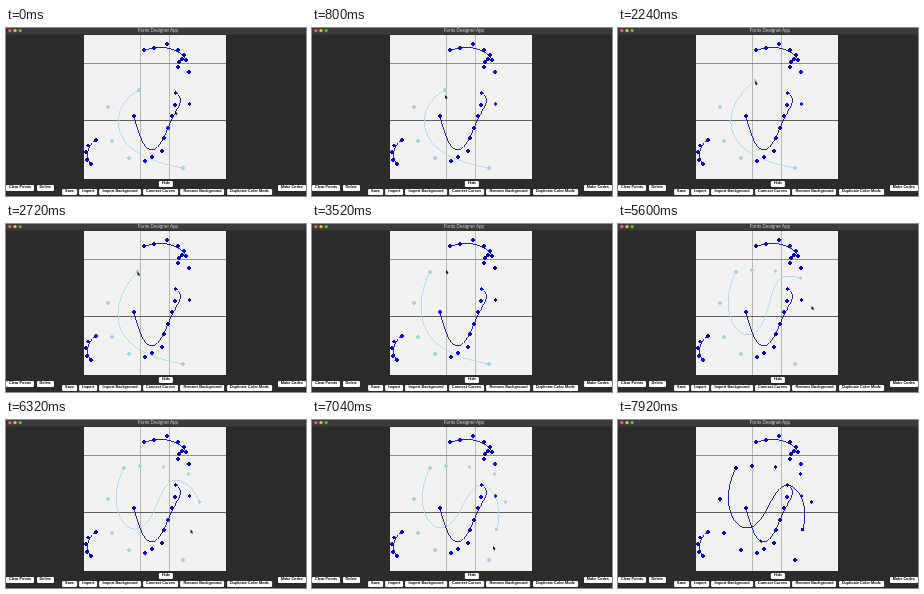
An HTML page for the animation above (8000 ms loop, 300 by 168 pixels).

```html
<!DOCTYPE html>
<html lang="en">
<head>
<meta charset="utf-8">
<title>Fonts Designer App</title>
<style>
  html, body { margin: 0; width: 100%; height: 100%; overflow: hidden; background: #2b2b2b; }
  svg { position: absolute; width: 300px; height: 168px; }
  .title { font: 4.6px "Liberation Sans", Arial, sans-serif; fill: #d0d0d0; text-anchor: middle; }
  .row { position: absolute; display: flex; gap: 2.4px; }
  .row span {
    padding: 0 3px; border-radius: 1.2px; background: #fff; color: #000; white-space: nowrap;
    font: bold 3.8px/5.6px "Liberation Sans", Arial, sans-serif;
  }
  .ink, .draft { shape-rendering: crispEdges; }
  .ink path, .draft path { fill: none; stroke-width: .85; }
  .ink path { stroke: #0000a8; }
  .ink circle { fill: #0000d0; }
  .draft path { stroke: #add8e6; }
  .draft circle { fill: #a5d5df; }
</style>
</head>
<body>
<svg viewBox="0 0 300 168">
  <rect width="300" height="168" fill="#2b2b2b"/>
  <rect width="300" height="6.5" fill="#3b3b3b"/>
  <circle cx="3.8" cy="2.6" r="1.7" fill="#fc5b57"/>
  <circle cx="9" cy="2.6" r="1.7" fill="#e5bf3c"/>
  <circle cx="14.2" cy="2.6" r="1.7" fill="#57c038"/>
  <text class="title" x="152" y="4.3">Fonts Designer App</text>
  <rect x="78" y="7" width="142" height="144" fill="#f2f2f2"/>
  <g fill="none" stroke-width=".7">
    <path d="M134.5 7V151M163.5 7V151" stroke="#9aa592"/>
    <path d="M78 35.5H220" stroke="#626a5c"/>
    <path d="M78 92.5H220" stroke="#202020"/>
  </g>
  <g id="draft"></g>
  <g id="glyph" class="ink"></g>
  <path id="cursor" d="M0 0V3.8L.9 3L1.6 4.5L2.2 4.2L1.6 2.8H2.8Z" fill="#111"/>
</svg>
<div class="row" style="left:0; top:157px"><span>Clear Points</span><span>Delete</span></div>
<div class="row" style="right:0; top:157px"><span>Make Codes</span></div>
<div class="row" style="left:160px; top:153px; transform:translateX(-50%)"><span>Hide</span></div>
<div class="row" style="left:161px; top:161px; transform:translateX(-50%)">
  <span>Save</span><span>Import</span><span>Import Background</span>
  <span>Connect Curves</span><span>Remove Background</span><span>Duplicate Color Mode</span>
</div>
<script>
const LOOP = 8000, STEP = 80, TRAVEL = 320;
const DRAG_START = 1840, DRAG_END = 3120, INKED_AT = 7360;
const byId = id => document.getElementById(id);
const clamp = u => Math.min(1, Math.max(0, u));
const mix = (a, b, u) => [a[0] + (b[0] - a[0]) * u, a[1] + (b[1] - a[1]) * u];

// de Casteljau evaluation for any number of control points
function bezier(points, u) {
  if (points.length === 1) return points[0];
  return bezier(points.slice(1).map((p, i) => mix(points[i], p, u)), u);
}

function curvePath(points, samples = 48) {
  let layer = Array.from({ length: samples + 1 }, (_, i) => {
    let p = points;
    while (p.length > 1) p = p.slice(1).map((q, k) => mix(p[k], q, i / samples));
    return p[0].map(v => v.toFixed(2)).join(' ');
  });
  return 'M' + layer.join('L');
}

// every stroke is one curve plus its visible control points
function drawStroke(group, points) {
  group.insertAdjacentHTML('beforeend', `<path d="${curvePath(points)}"/>` +
    points.map(([x, y]) => `<circle cx="${x}" cy="${y}" r="1.7"/>`).join(''));
}

const strokes = [
  [[138, 22], [148, 20], [161, 16], [172, 22], [178, 27], [180, 32]],
  [[172, 39]], [[183, 44]],
  [[173, 34], [176, 31]],
  [[128, 88], [139, 133], [146, 129], [156, 123], [158, 110], [162, 100],
    [166, 88], [169, 77], [183.5, 76], [169.5, 65]],
  [[90, 112], [82, 117.5], [80, 124], [81, 132], [85, 136]]
];
strokes.forEach(points => drawStroke(byId('glyph'), points));

const base = [[102, 79], [106, 113], [123, 130], [177, 140]];
const dragPath = [[133, 62], [146, 44], [118, 48]];
const clicks = [
  { at: 3600, p: [134, 46] }, { at: 4080, p: [157.5, 47] }, { at: 5120, p: [182.5, 54] },
  { at: 5680, p: [193.5, 82] }, { at: 6400, p: [184.5, 109.5] }
];
const hovers = [
  { at: 0, p: [169, 83] }, { at: 800, p: [133, 67] }, { at: DRAG_START, p: dragPath[0] },
  { at: DRAG_END, p: dragPath[2] }, { at: 4400, p: [167, 51] },
  { at: 7040, p: [181, 126] }, { at: 7920, p: [142, 119] }
];
// the pointer reaches a click position one step before the click lands
const stops = [...hovers, ...clicks.map(({ at, p }) => ({ at: at - STEP, p }))]
  .sort((a, b) => a.at - b.at);

const dragged = t => bezier(dragPath, clamp((t - DRAG_START) / (DRAG_END - DRAG_START)));

function pointer(t) {
  if (t >= DRAG_START && t <= DRAG_END) return dragged(t);
  return stops.reduce((pos, { at, p }) => mix(pos, p, clamp((t - at + TRAVEL) / TRAVEL)), stops[0].p);
}

function render(t) {
  const draft = byId('draft');
  const added = clicks.filter(c => c.at <= t).map(c => c.p);
  draft.replaceChildren();
  drawStroke(draft, [dragged(t), ...base, ...added]);
  draft.setAttribute('class', t >= INKED_AT ? 'ink' : 'draft');
  byId('cursor').setAttribute('transform', `translate(${pointer(t)})`);
}

const start = performance.now();
let shown = -1;
function tick() {
  const t = Math.floor((performance.now() - start) % LOOP / STEP) * STEP;
  if (t !== shown) render(shown = t);
  requestAnimationFrame(tick);
}
tick();
</script>
</body>
</html>
```
